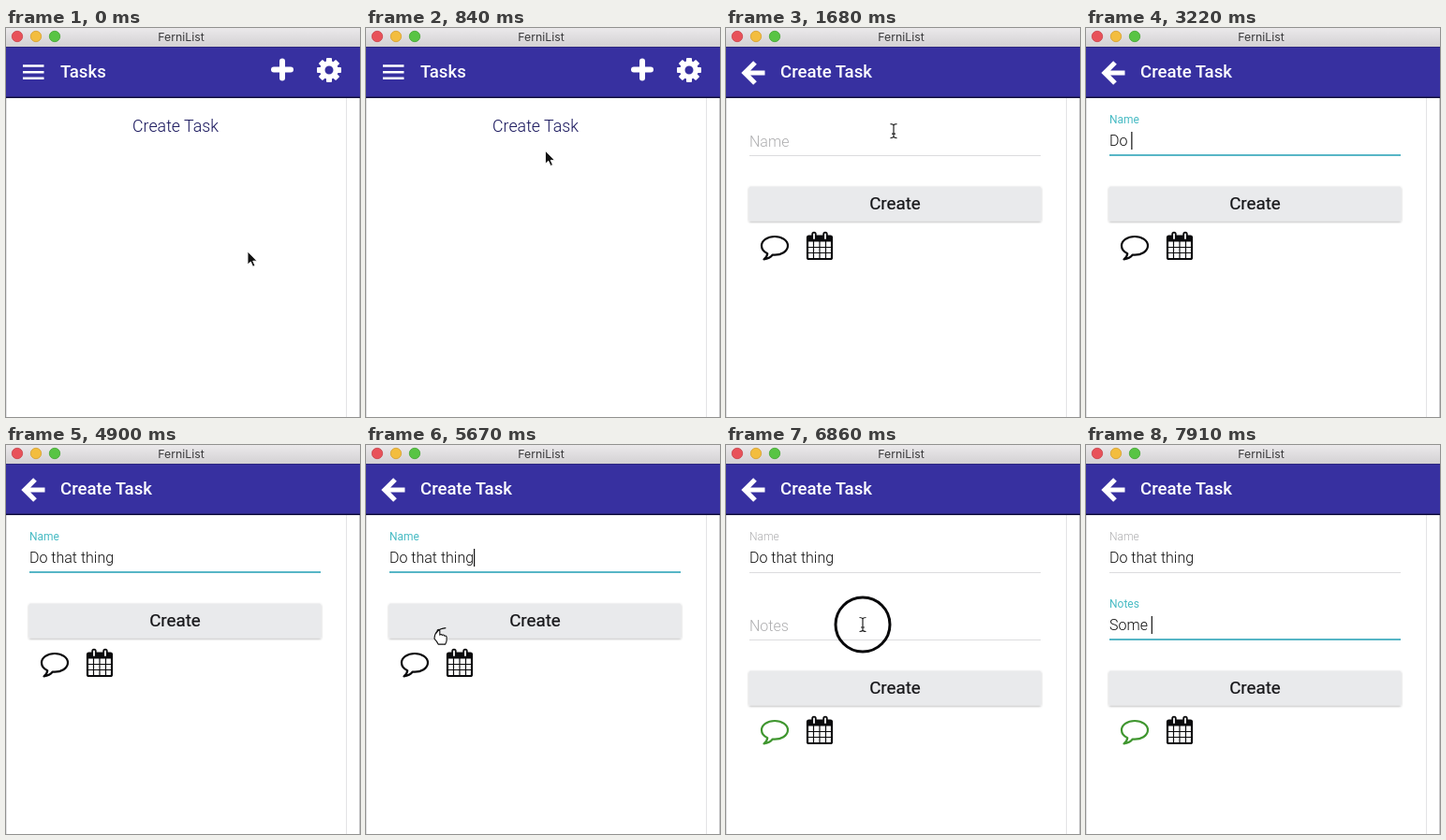
These frames come from a looping animation (378 px wide and 416 px high, 8 s). An HTML page:

```html
<!DOCTYPE html>
<html lang="en">
<head>
<meta charset="utf-8">
<title>Create a task</title>
<style>
  html, body { margin: 0; width: 100%; height: 100%; overflow: hidden; background: #fff; }
  svg { display: block; width: 100%; height: 100%; }
  text { font-family: Roboto, sans-serif; white-space: pre; }
  .light { font-weight: 300; }
  .head { font-size: 18.6px; font-weight: 500; fill: #fff; }
  .icon { fill: none; stroke: #fff; stroke-linecap: round; stroke-linejoin: round; }
</style>
</head>
<body>
<svg viewBox="0 0 378 416">
  <defs>
    <linearGradient id="chrome" x2="0" y2="1">
      <stop offset="0" stop-color="#ebe9eb"/><stop offset="1" stop-color="#d3d1d3"/>
    </linearGradient>
    <filter id="soft" x="-5%" y="-20%" width="110%" height="150%">
      <feDropShadow dx="0" dy="1" stdDeviation="1" flood-opacity=".3"/>
    </filter>
  </defs>

  <rect width="378" height="416" fill="#fff"/>
  <path d="M.5 75V416M363.5 75V416" stroke="#e3e3e5"/>
  <path d="M377.5 75V416" stroke="#c9c9cb"/>

  <rect width="378" height="20" fill="url(#chrome)"/>
  <g stroke-width=".8">
    <circle cx="12" cy="9" r="5.7" fill="#e8525a" stroke="#c9414a"/>
    <circle cx="32" cy="9" r="5.7" fill="#f3bd3e" stroke="#d59f2c"/>
    <circle cx="52" cy="9" r="5.7" fill="#58c444" stroke="#3fa52f"/>
  </g>
  <text x="187" y="13.8" text-anchor="middle" font-size="12.3" fill="#3a3a3c" style="font-family:Inter,sans-serif">FerniList</text>

  <rect y="20" width="378" height="54" fill="#3730a0"/>
  <path d="M0 20.5H378" stroke="#2c267f"/>
  <path d="M0 74.3H378" stroke="#12103f" stroke-width="1.4"/>

  <g id="list">
    <path class="icon" style="stroke-linecap:butt" stroke-width="2.4" d="M18 40.5H40.500M18 47.200H40.500M18 53.800H40.500"/>
    <text class="head" x="58" y="53">Tasks</text>
    <path class="icon" stroke-width="6" d="M286 44.500H304M295 35.500V53.500"/>
    <g id="gear" transform="translate(345 45)" fill="#fff">
      <circle r="7.200" fill="none" stroke="#fff" stroke-width="5.400"/>
    </g>
    <rect id="row" y="81" width="363" height="48" fill="#e5e3e4"/>
    <text class="light" x="181" y="111" text-anchor="middle" font-size="17.8" fill="#17155c">Create Task</text>
  </g>

  <g id="form">
    <path class="icon" style="stroke-linecap:butt;stroke-linejoin:miter" stroke-width="5.200" d="M31 37L20 48L31 59M20 48H41.500"/>
    <text class="head" x="58" y="53">Create Task</text>
    <g id="fields"></g>
    <g id="actions">
      <rect x="24.500" y="169.500" width="312" height="37" rx="1.500" fill="#e9eaec" filter="url(#soft)"/>
      <text x="180.500" y="194" text-anchor="middle" font-size="18.800" fill="#151518" stroke="#151518" stroke-width=".2">Create</text>
      <circle id="press" cx="52" cy="233" r="10.500" fill="#e8e8ea"/>
      <path id="bubble" fill="none" stroke-width="2.200" stroke-linejoin="round"
        d="M52 223C44 223 38 227.300 38 232.800C38 236.400 40.500 239.500 44.300 241.200C44 243.800 42.700 245.700 40.500 247.300C44.500 246.800 47.700 245.200 49.800 242.500C59 243.300 66 238.800 66 232.800C66 227.300 60 223 52 223Z"/>
      <g fill="none" stroke="#0b0b0d">
        <rect x="87" y="222.500" width="26" height="24.500" rx="1.500" stroke-width="2.200"/>
        <path d="M87 225.500H113" stroke-width="6"/>
        <path d="M93.500 228V247M100 228V247M106.500 228V247M87 234.500H113M87 240.500H113" stroke-width="1.200"/>
        <path d="M94 220.500V225M106 220.500V225" stroke-width="5.400" stroke-linecap="round"/>
        <path d="M94 220.500V225M106 220.500V225" stroke="#fff" stroke-width="1.800" stroke-linecap="round"/>
      </g>
    </g>
  </g>

  <g id="cursor">
    <circle id="ring" r="29" fill="none" stroke="#08080a" stroke-width="3"/>
    <path id="arrow" d="M0 0V14L3.300 11L5.600 16.200L8 15.200L5.700 10.200H10Z" fill="#111" stroke="#fff" stroke-width=".9"/>
    <path id="hand" fill="#fff" stroke="#111" stroke-width="1.100" stroke-linejoin="round"
      d="M-1.500 1.500Q0-1 1.500 1.500V6Q3 4.500 4 6.300Q5.500 5.200 6.500 7Q8.500 6.500 8.800 8.500V12Q8.500 14 7.300 16H0Q-1.500 13-4.300 10Q-4-.5 8-1.500 9.700Z"/>
    <path id="beam" fill="none" stroke="#222" stroke-width="1.200" d="M-3.500-7.500Q-.5-7.500 0-6Q.5-7.500 3.500-7.500M0-6V6M-3.500 7.500Q-.5 7.500 0 6Q.5 7.500 3.500 7.500M-2 3H2"/>
  </g>
</svg>
<script>
const LOOP = 8000, FORM_AT = 1650, NOTES_AT = 6440, SHIFT = 72;
const TEAL = [72, 187, 196], GREY = [174, 174, 176];
const NS = 'http://www.w3.org/2000/svg';
const $ = id => document.getElementById(id);

function add(parent, tag, attrs) {
  const el = document.createElementNS(NS, tag);
  set(el, attrs);
  return parent.appendChild(el);
}
function set(el, attrs) {
  for (const k in attrs) el.setAttribute(k, attrs[k]);
}
const show = (el, on) => set(el, { visibility: on ? 'inherit' : 'hidden' });
const within = (t, a, b) => t >= a && t < b;
const lerp = (a, b, p) => a + (b - a) * p;
const ease = (t, start, span) => {
  const p = Math.min(1, Math.max(0, (t - start) / span));
  return p * p * (3 - 2 * p);
};

// Cursor way points: time, x, y
const path = [
  [70, 258, 239], [1100, 179, 111], [1820, 179, 110], [1960, 177, 114],
  [2100, 179, 108], [2730, 179, 108], [4970, 170, 110], [5810, 70, 204],
  [6040, 58, 237], [NOTES_AT, 58, 237], [6720, 146, 192]
];
const clicks = [[1400, 1610], [2170, 2310], [6060, 6220], [6830, 6980]];

const name = {
  ...makeField('Name', 0), focusAt: 2240, blurAt: 6135, value: 'Do that thing',
  keys: [2730, 3010, 3220, 3290, 3360, 3500, 3570, 3710, 3780, 3920, 4130, 4200, 4380]
};
const notes = {
  ...makeField('Notes', SHIFT), focusAt: 6910, blurAt: Infinity, value: 'Some ',
  keys: [7490, 7630, 7700, 7840, 7910]
};

for (let i = 0; i < 8; i++)
  add($('gear'), 'rect', { x: -3, y: -13, width: 6, height: 5, rx: 1, transform: `rotate(${i * 45})` });

function makeField(label, dy) {
  const g = add($('fields'), 'g', { transform: `translate(0 ${dy})` });
  add(g, 'path', { d: 'M25 136.5H336', stroke: '#dcdcde' });
  const line = add(g, 'path', { stroke: '#57b6c6', 'stroke-width': 2 });
  const caption = add(g, 'text', { 'font-size': 16 });
  caption.textContent = label;
  const text = add(g, 'text', { class: 'light', x: 25, y: 126, 'font-size': 16, fill: '#111' });
  const caret = add(g, 'path', { stroke: '#111', 'stroke-width': 1.2 });
  return { g, line, caption, text, caret };
}

function drawField(f, t) {
  const focus = ease(t, f.focusAt, 260) * (1 - ease(t, f.blurAt, 250));
  const typed = f.keys.filter(k => k <= t);
  const lift = typed.length ? 1 : focus;
  const half = 155.5 * focus;
  set(f.line, { d: `M${180.5 - half} 136H${180.5 + half}` });
  show(f.line, focus > 0);
  set(f.caption, {
    transform: `translate(25 ${lerp(126.5, 102, lift)}) scale(${lerp(1, .75, lift)})`,
    fill: `rgb(${GREY.map((c, i) => lerp(c, TEAL[i], focus))})`,
    'font-weight': focus > 0 ? 400 : 300
  });
  f.text.textContent = f.value.slice(0, typed.length);
  const x = 25.5 + (typed.length ? f.text.getComputedTextLength() : 0);
  set(f.caret, { d: `M${x} 111V130` });
  const last = typed.length ? typed[typed.length - 1] : f.focusAt;
  show(f.caret, within(t, f.focusAt, f.blurAt) && (t - last) % 1000 < 500);
}

function cursorAt(t) {
  const i = path.findIndex(p => p[0] > t);
  if (i === 0) return path[0].slice(1);
  if (i < 0) return path[path.length - 1].slice(1);
  const [a, b] = [path[i - 1], path[i]];
  const p = ease(t, a[0], b[0] - a[0]);
  return [lerp(a[1], b[1], p), lerp(a[2], b[2], p)];
}

function cursorKind(x, y, t, dy) {
  const over = (l, top, r, b) => x >= l && x <= r && y >= top && y <= b;
  if (t < FORM_AT) return over(0, 81, 363, 129) ? 'hand' : 'arrow';
  if (over(25, 100, 336, 137) || dy && over(25, 172, 336, 209)) return 'beam';
  const button = over(24, 169 + dy, 337, 207 + dy);
  const icons = over(36, 218 + dy, 114, 248 + dy);
  return button || icons ? 'hand' : 'arrow';
}

function render(t) {
  const open = t >= FORM_AT, expanded = t >= NOTES_AT;
  const dy = expanded ? SHIFT : 0;
  show($('list'), !open);
  show($('form'), open);
  show(notes.g, expanded);
  set($('actions'), { transform: `translate(0 ${dy})` });
  set($('bubble'), { stroke: expanded ? '#3f962f' : '#0b0b0d' });
  show($('press'), within(t, 6120, NOTES_AT));
  if (open) {
    drawField(name, t);
    drawField(notes, expanded ? t : 0);
    if (!expanded) show(notes.caret, false), set(notes.line, { visibility: 'hidden' });
  }

  const [x, y] = cursorAt(t);
  const kind = cursorKind(x, y, t, dy);
  set($('cursor'), { transform: `translate(${x} ${y})` });
  show($('cursor'), !within(t, 2730, 5040) && t < 7490);
  for (const k of ['arrow', 'hand', 'beam']) show($(k), k === kind);
  show($('ring'), clicks.some(([a, b]) => within(t, a, b)));
  show($('row'), !open && kind === 'hand');
}

const start = performance.now();
function tick() {
  render((performance.now() - start) % LOOP);
  requestAnimationFrame(tick);
}
tick();
</script>
</body>
</html>
```
